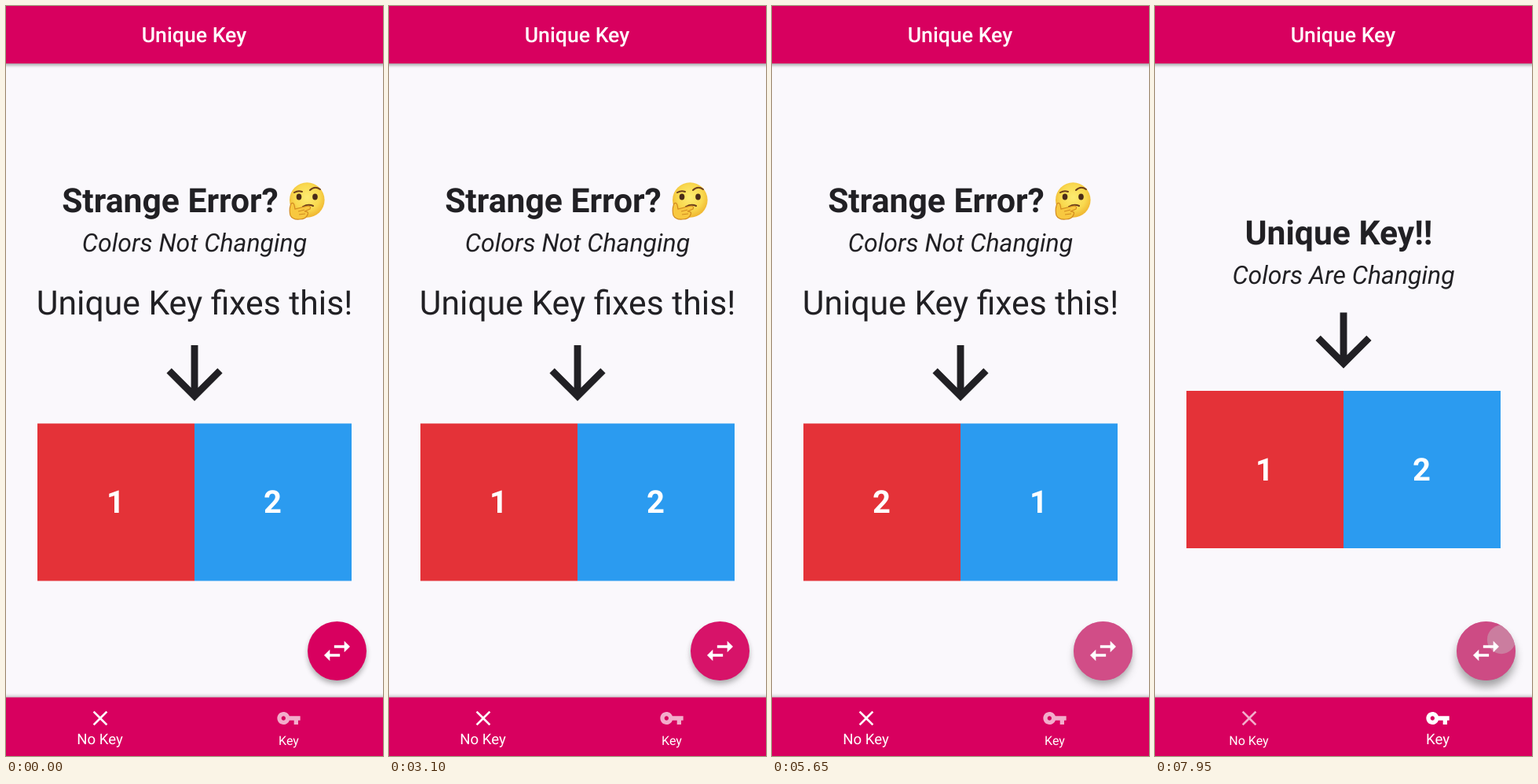
These frames come from a looping animation (480 px wide and 953 px high, 8000 ms). An HTML page:

```html
<!DOCTYPE html>
<html lang="en">
<head>
<meta charset="utf-8">
<title>Unique Key</title>
<style>
  html, body { margin: 0; width: 100%; height: 100%; overflow: hidden; background: #faf8fc; }
  svg { display: block; width: 480px; height: 953px; font-family: Roboto, sans-serif; }
  text { text-anchor: middle; text-rendering: geometricPrecision; }
  .ink { fill: #212024; }
  .bar { fill: #d8005f; }
  .white { fill: #fff; }
  .head { font-size: 42.67px; font-weight: 700; }
  .sub { font-size: 32px; font-style: italic; }
  .digit { font-size: 40px; font-weight: 700; }
  .label { font-size: 18.67px; }
</style>
</head>
<body>
<svg viewBox="0 0 480 953">
  <defs>
    <filter id="soft" x="-50%" y="-50%" width="200%" height="200%"><feGaussianBlur stdDeviation="3.5"/></filter>
    <filter id="softer" x="-50%" y="-50%" width="200%" height="200%"><feGaussianBlur stdDeviation="6"/></filter>
    <filter id="edge" x="-5%" y="-20%" width="110%" height="140%"><feGaussianBlur stdDeviation="2.2"/></filter>
    <clipPath id="fabClip"><circle cx="421.5" cy="819.5" r="37.5"/></clipPath>
    <radialGradient id="skin" cx=".5" cy=".42" r=".6">
      <stop offset="0" stop-color="#fdec72"/><stop offset=".6" stop-color="#f9d94f"/><stop offset="1" stop-color="#eeb02c"/>
    </radialGradient>
  </defs>

  <rect width="480" height="953" fill="#faf8fc"/>
  <rect x="-5" y="3" width="490" height="72" opacity=".38" filter="url(#edge)"/>
  <rect class="bar" width="480" height="73"/>
  <text class="white" x="239.5" y="46" font-size="26.67" font-weight="500">Unique Key</text>

  <g id="plainPage" class="ink">
    <text class="head" x="209" y="261.5">Strange Error?</text>
    <g id="thinker">
      <circle cx="383.3" cy="246.5" r="22.3" fill="url(#skin)"/>
      <g fill="#4a2b18">
        <ellipse cx="373" cy="242.5" rx="3.3" ry="4"/>
        <ellipse cx="393.5" cy="242.5" rx="3.3" ry="4"/>
      </g>
      <g fill="none" stroke="#6b3e1d" stroke-width="2" stroke-linecap="round">
        <path d="M367 237q5-3 10-1"/>
        <path d="M387 234q6-6 13-1"/>
        <path d="M378 255q7-4 13-1"/>
      </g>
      <path d="M363 251q3-2 4 2l1 5 16-4q5 0 3 4l-7 3q6 0 4 4-2 6-10 6-9 1-12-5-2-8 1-15z" fill="#f8c840" stroke="#d28b20" stroke-width="1.2"/>
      <path d="M372 261l8-2M373 265l8-1" stroke="#d28b20" fill="none"/>
    </g>
    <text class="sub" x="240" y="312">Colors Not Changing</text>
    <text x="240" y="391.5" font-size="42.67">Unique Key fixes this!</text>
  </g>
  <g id="keyPage" class="ink">
    <text class="head" x="234" y="303">Unique Key!!</text>
    <text class="sub" x="240" y="353.3">Colors Are Changing</text>
  </g>

  <g id="demo">
    <path class="ink" transform="translate(186.7 413.2) scale(4.444)" d="M20 12l-1.41-1.41L13 16.17V4h-2v12.17l-5.58-5.59L4 12l8 8 8-8z"/>
    <rect x="40" y="530.5" width="200" height="200" fill="#e43238"/>
    <rect x="240" y="530.5" width="200" height="200" fill="#2b9bf0"/>
    <text id="left" class="digit white" x="139.5" y="644">1</text>
    <text id="right" class="digit white" x="339.5" y="644">2</text>
  </g>

  <circle id="restShadow" cx="421.5" cy="824" r="37" filter="url(#soft)"/>
  <circle id="liftShadow" cx="421.5" cy="828" r="37" filter="url(#softer)"/>
  <circle class="bar" cx="421.5" cy="819.5" r="37.5"/>
  <g clip-path="url(#fabClip)">
    <circle id="highlight" cx="421.5" cy="819.5" r="38" fill="#bcbcbc"/>
    <circle id="splash" fill="#c8c8c8"/>
  </g>
  <path class="white" transform="translate(399.5 797.5) scale(1.833)" d="M6.99 11L3 15l3.99 4v-3H14v-2H6.99v-3zM21 9l-3.99-4v3H10v2h7.01v3L21 9z"/>

  <rect x="-5" y="877" width="490" height="80" opacity=".25" filter="url(#edge)"/>
  <rect class="bar" y="878.5" width="480" height="75"/>
  <g class="white">
    <path id="crossIcon" transform="translate(104 889) scale(1.333)" d="M19 6.41L17.59 5 12 10.59 6.41 5 5 6.41 10.59 12 5 17.59 6.41 19 12 13.41 17.59 19 19 17.59 13.41 12z"/>
    <path id="keyIcon" transform="translate(344 889) scale(1.333)" d="M12.65 10C11.83 7.67 9.61 6 7 6c-3.31 0-6 2.69-6 6s2.69 6 6 6c2.61 0 4.83-1.67 5.65-4H17v4h4v-4h2v-4H12.65zM7 14c-1.1 0-2-.9-2-2s.9-2 2-2 2 .9 2 2-.9 2-2 2z"/>
    <text id="crossLabel" class="label">No Key</text>
    <text id="keyLabel" class="label">Key</text>
  </g>
</svg>
<script>
const LOOP = 8000, PAGE_AT = 7200, FADE = 200, SWAP_LAG = 50;
const $ = id => document.getElementById(id);
const clamp = v => Math.max(0, Math.min(1, v));
const set = (id, attrs) => {
  for (const name in attrs) $(id).setAttribute(name, attrs[name]);
};

// Each burst: first press, then the release times.
const bursts = [
  [40, 400, 930],
  [1390, 1725, 2125, 2525, 2925, 3280, 3545],
  [3940, 4180, 4540, 4885, 5230, 5575, 6030, 6478]
];
const taps = bursts.flatMap(([start, ...releases]) =>
  releases.map((up, i) => ({ down: i ? releases[i - 1] + 190 : start, up, x: 421, y: 814 })));
taps.push({ down: 7716, up: Infinity, x: 441, y: 805 });

function drawButton(t) {
  const tap = taps.filter(p => p.down <= t).pop();
  let level = 0, glow = 0, radius = 0;
  if (tap) {
    const reach = Math.hypot(Math.abs(tap.x - 421.5) + 37.5, Math.abs(tap.y - 819.5) + 37.5);
    const held = Math.min(t, tap.up) - tap.down;
    const fade = 1 - clamp((t - tap.up) / FADE);
    radius = reach * clamp(held / 1000);
    radius += (reach - radius) * clamp((t - tap.up) / 50);
    level = clamp(held / FADE) * fade;
    glow = fade;
    set('splash', { cx: tap.x, cy: tap.y });
  }
  set('splash', { r: radius, opacity: 0.4 * glow });
  set('highlight', { opacity: 0.4 * level });
  set('restShadow', { opacity: 0.32 * (1 - level) });
  set('liftShadow', { opacity: 0.36 * level });
}

function drawLabel(name, x, selected) {
  set(name + 'Icon', { opacity: 0.68 + 0.32 * selected });
  set(name + 'Label', {
    transform: `translate(${x} ${939 - selected}) scale(${(12 + 2 * selected) / 14})`
  });
}

function draw(t) {
  const keyed = t >= PAGE_AT;
  const swaps = taps.filter(p => p.up + SWAP_LAG <= t).length;
  const swapped = !keyed && swaps % 2 === 1;
  $('plainPage').style.display = keyed ? 'none' : '';
  $('keyPage').style.display = keyed ? '' : 'none';
  set('demo', { transform: `translate(0 ${keyed ? -41.5 : 0})` });
  $('left').textContent = swapped ? 2 : 1;
  $('right').textContent = swapped ? 1 : 2;
  drawButton(t);
  const p = clamp((t - PAGE_AT + 30) / 200);
  const eased = p * p * (3 - 2 * p);
  drawLabel('cross', 119.5, 1 - eased);
  drawLabel('key', 360, eased);
}

const start = performance.now();
function tick() {
  draw((performance.now() - start) % LOOP);
  requestAnimationFrame(tick);
}
tick();
</script>
</body>
</html>
```
